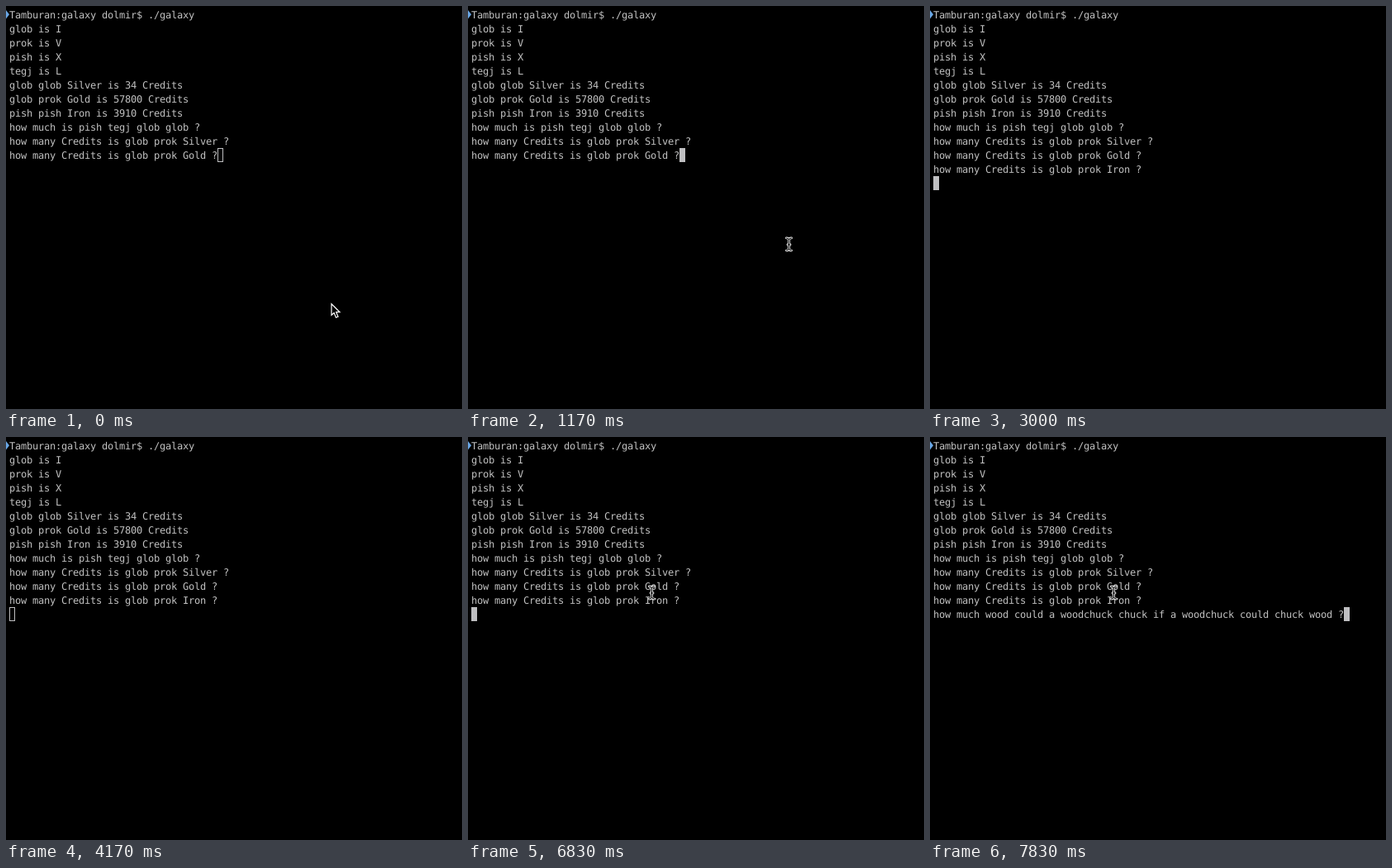
These frames come from a looping animation (552x488 px, 8 s). An HTML page with a canvas:

```html
<!DOCTYPE html>
<html lang="en">
<head>
<meta charset="utf-8">
<title>Terminal</title>
<style>
html, body { margin: 0; width: 100%; height: 100%; overflow: hidden; background: #000; }
canvas { display: block; }
</style>
</head>
<body>
<canvas id="stage" width="552" height="488"></canvas>
<script>
const ctx = document.getElementById('stage').getContext('2d');
const LOOP = 8000, LEFT = 4, CELL = 7, ROW = 17;
const TEXT = '#c2c2c2', BLOCK = '#bfbfc1';

const lines = [
  'Tamburan:galaxy dolmir$ ./galaxy',
  'glob is I',
  'prok is V',
  'pish is X',
  'tegj is L',
  'glob glob Silver is 34 Credits',
  'glob prok Gold is 57800 Credits',
  'pish pish Iron is 3910 Credits',
  'how much is pish tegj glob glob ?',
  'how many Credits is glob prok Silver ?',
  'how many Credits is glob prok Gold ?'
];
const iron = 'how many Credits is glob prok Iron ?';
const wood = 'how much wood could a woodchuck chuck if a woodchuck could chuck wood ?';

// Each step overrides part of the state from its start time on.
const steps = [
  { at: 0, typed: [], focus: false, arrow: [394, 360], beam: null },
  { at: 170, arrow: [390, 312] },
  { at: 330, focus: true, arrow: null, beam: [388.5, 288.5] },
  { at: 1330, typed: [''], beam: null },
  { at: 2000, typed: [iron] },
  { at: 2670, typed: [iron, ''] },
  { at: 4000, focus: false },
  { at: 6670, focus: true, beam: [222.5, 188.5] },
  { at: 7500, typed: [iron, wood] }
];

function stateAt(t) {
  return Object.assign({}, ...steps.filter(s => s.at <= t));
}

function trace(points) {
  ctx.beginPath();
  points.forEach(([x, y]) => ctx.lineTo(x, y));
}

function drawMark() {
  trace([[0, 5], [4, 10.3], [0, 15.6]]);
  ctx.fillStyle = '#69a7e6';
  ctx.fill();
}

// Glyphs sit on the terminal's whole-pixel cell grid.
function drawLine(line, row) {
  [...line].forEach((ch, col) => ctx.fillText(ch, LEFT + col * CELL, 15 + row * ROW));
}

function drawCaret(col, row, solid) {
  const x = LEFT + col * CELL, y = 2 + row * ROW;
  if (solid) {
    ctx.fillStyle = BLOCK;
    ctx.fillRect(x, y, CELL, ROW);
  } else {
    ctx.strokeStyle = BLOCK;
    ctx.lineWidth = 1;
    ctx.strokeRect(x + 0.5, y + 0.5, CELL - 1, ROW - 1);
  }
}

function drawArrow([x, y]) {
  ctx.save();
  ctx.translate(x, y);
  trace([[0, 0.8], [0, 14.3], [3.1, 11.5], [5.5, 17.2], [8, 16.2], [5.7, 10.7], [10, 10.7]]);
  ctx.closePath();
  ctx.fillStyle = '#000';
  ctx.fill();
  ctx.strokeStyle = '#fff';
  ctx.lineWidth = 1.2;
  ctx.stroke();
  ctx.restore();
}

function drawBeam([x, y]) {
  ctx.save();
  ctx.translate(x, y);
  ctx.beginPath();
  for (const s of [-1, 1]) {
    ctx.moveTo(-3, 7.6 * s);
    ctx.quadraticCurveTo(0, 7.6 * s, 0, 5 * s);
    ctx.quadraticCurveTo(0, 7.6 * s, 3, 7.6 * s);
  }
  ctx.moveTo(0, -6);
  ctx.lineTo(0, 6);
  ctx.moveTo(-1.5, 0.5);
  ctx.lineTo(1.5, 0.5);
  ctx.lineJoin = ctx.lineCap = 'round';
  for (const [color, width] of [['#eee', 2.8], ['#000', 1]]) {
    ctx.strokeStyle = color;
    ctx.lineWidth = width;
    ctx.stroke();
  }
  ctx.restore();
}

function draw(t) {
  const state = stateAt(t);
  const rows = [...lines, ...state.typed];
  const last = rows.length - 1;
  ctx.fillStyle = '#000';
  ctx.fillRect(0, 0, 552, 488);
  drawMark();
  ctx.font = '12px "DejaVu Sans Mono", monospace';
  ctx.textRendering = 'geometricPrecision';
  ctx.fillStyle = TEXT;
  rows.forEach(drawLine);
  drawCaret(rows[last].length, last, state.focus);
  if (state.arrow) drawArrow(state.arrow);
  if (state.beam) drawBeam(state.beam);
}

const start = performance.now();
function tick() {
  draw((performance.now() - start) % LOOP);
  requestAnimationFrame(tick);
}
tick();
</script>
</body>
</html>
```
